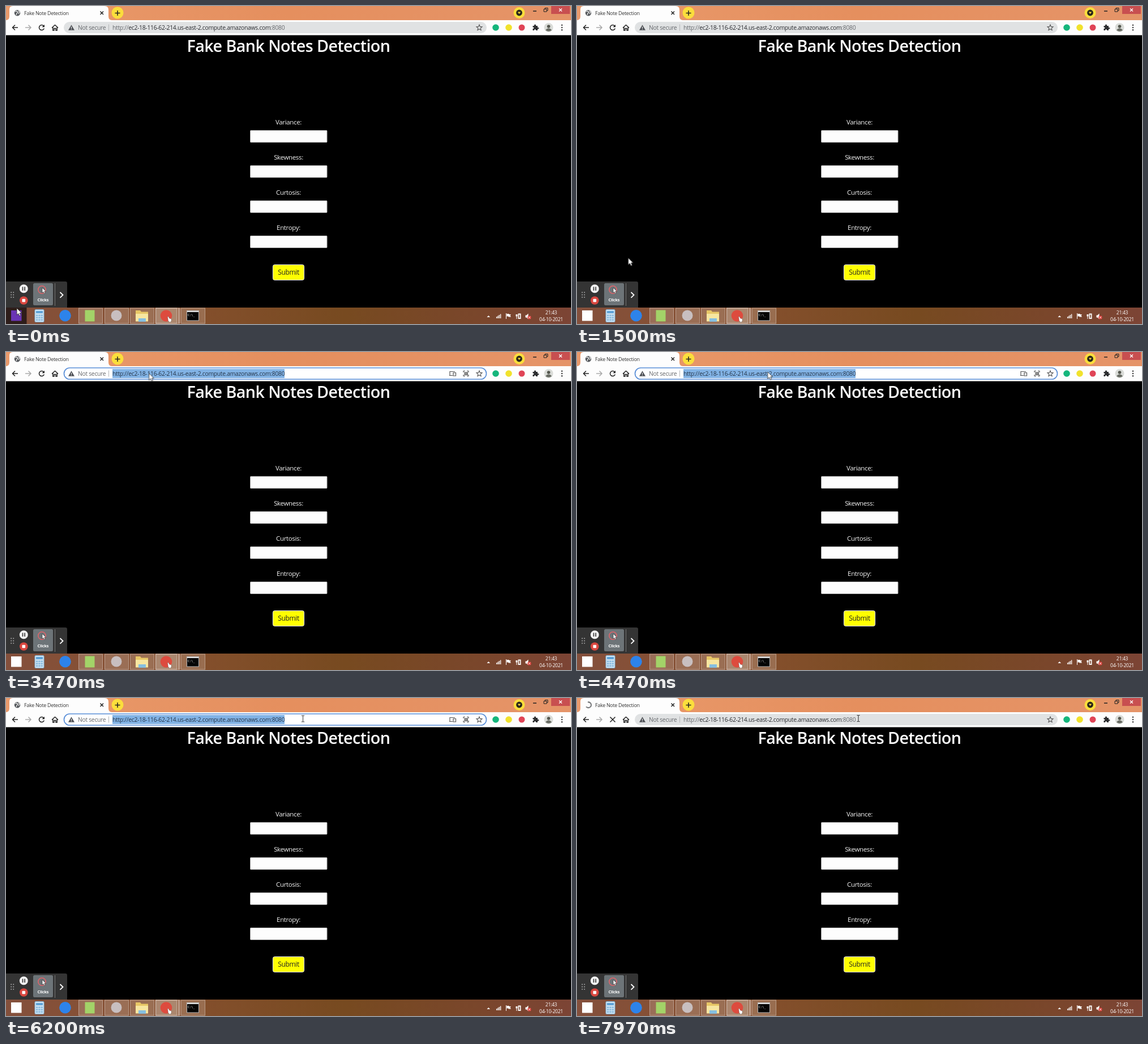
An HTML page for the animation above (8000 ms loop, 998 px wide and 561 px high).

```html
<!DOCTYPE html>
<html lang="en">
<head>
<meta charset="utf-8">
<title>Fake Note Detection</title>
<style>
  html, body { margin: 0; width: 100%; height: 100%; overflow: hidden; background: #000; }
  svg { display: block; width: 100vw; height: 100vh; }
  text { font-family: "Open Sans", "Noto Sans", sans-serif; letter-spacing: -.03em; white-space: pre; }
  .title { letter-spacing: -.02em; }
  .mid { text-anchor: middle; }
  .line { fill: none; stroke: #222; stroke-width: 1.5; }
  .tile { fill: #fff; fill-opacity: .17; stroke: #fff; stroke-opacity: .38; }
</style>
</head>
<body>
<svg viewBox="0 0 998 561" preserveAspectRatio="none">
  <defs>
    <linearGradient id="bar">
      <stop offset="0" stop-color="#84503c"/>
      <stop offset=".3" stop-color="#86502e"/>
      <stop offset=".6" stop-color="#774a20"/>
      <stop offset=".85" stop-color="#7a462c"/>
      <stop offset="1" stop-color="#7c4435"/>
    </linearGradient>
    <linearGradient id="frame">
      <stop offset="0" stop-color="#e99a6c"/>
      <stop offset=".5" stop-color="#e58f5e"/>
      <stop offset="1" stop-color="#e59468"/>
    </linearGradient>
    <path id="arrow" d="M0 0V12.2L2.8 9.6L4.8 14L6.9 13L5 8.8H8.7Z" fill="#fff" stroke="#222" stroke-width=".8"/>
  </defs>

  <rect width="998" height="561"/>

  <!-- Window frame and tab -->
  <rect width="998" height="26" fill="url(#frame)"/>
  <path d="M0 25Q6 25 6 18V6Q6 0 12 0H174Q181 0 181 7V18Q181 25 187 25Z" fill="#fdfdfd"/>
  <g id="globe">
    <circle cx="20" cy="12.3" r="5.2" fill="#55585c"/>
    <path d="M16 10L19 9L21 11L19 13L18 16M22 8L24 11L22 14" fill="none" stroke="#f4f4f4" stroke-width="1.3"/>
  </g>
  <path id="spinner" d="M20 7.2A5 5 0 1 1 15.7 14.7" fill="none" stroke="#3b3d40" stroke-width="1.4"/>
  <text x="32" y="15.5" font-size="8.9" fill="#333">Fake Note Detection</text>
  <path class="line" d="M166.5 9.5L172 15M172 9.5L166.5 15"/>
  <circle cx="197" cy="12" r="10.5" fill="#fbde3c"/>
  <path class="line" d="M192.5 12.5H201.5M197 8V17"/>
  <circle cx="906.5" cy="12" r="10" fill="#fbde3c"/>
  <circle cx="906.5" cy="12" r="5.4" fill="#29261a"/>
  <path d="M903.8 10.6H909.2L906.5 14Z" fill="#fbde3c"/>
  <path class="line" d="M931 9H937"/>
  <path class="line" style="stroke-width:1" d="M950 5.500H955V10H950ZM952 5.500V3.500H957V8H955"/>
  <rect x="963" width="33" height="14" fill="#c84f50"/>
  <path d="M977 4.5L982 9.5M982 4.5L977 9.5" stroke="#fff" stroke-width="1.3"/>

  <!-- Toolbar -->
  <rect y="25" width="998" height="26.500" fill="#fdfdfd"/>
  <path class="line" d="M21 38H12M16 33.5L11.5 38L16 42.5"/>
  <path class="line" style="stroke:#aaa" d="M34 38H43.5M39.5 33.5L44 38L39.5 42.5"/>
  <g id="reload">
    <path class="line" d="M66.5 35.2A4.5 4.5 0 1 0 67.3 39.5"/>
    <path d="M68 32.8V37.2H63.5Z" fill="#222"/>
  </g>
  <path id="stop" class="line" d="M58.5 33.5L67.5 42.5M67.5 33.5L58.5 42.5"/>
  <path class="line" d="M81 38.5L86.5 33.5L92 38.5M82.8 37.5V43H85V39.5H88V43H90.2V37.5"/>
  <rect x="102" y="28" width="747" height="20" rx="10" fill="#e0e2e3"/>
  <g id="focus">
    <rect x="102.5" y="28" width="746" height="20" rx="10" fill="#fff" stroke="#5a8fd8" stroke-width="1.7"/>
    <rect x="188" y="30" width="304" height="16" fill="#82b3e5"/>
    <path d="M784 41V34.5H793M783 41.5H789M790 36.5H794.5V42H790Z" fill="none" stroke="#555" stroke-width="1.2"/>
    <path d="M808 36V33.5H811M814 33.5H817V36M817 40V42.5H814M811 42.5H808V40M810 36H812V37.5H810ZM813.5 36H815.5V37.5H813.5ZM810 39H812V40.5H810ZM813.5 39H815.5V40.5H813.5Z" fill="none" stroke="#555" stroke-width="1.1"/>
  </g>
  <path d="M115.5 33.2L121 42.8H110Z" fill="#505358"/>
  <path d="M115.5 36.5V39.5M115.5 40.5V41.6" stroke="#fff"/>
  <g font-size="10.4" fill="#66696d">
    <text x="127" y="41.7">Not secure</text>
    <text id="url" x="188" y="41.7">http://<tspan fill="#2a2c30">ec2-18-116-62-214.us-east-2.compute.amazonaws.com</tspan>:8080</text>
    <text id="picked" x="188" y="41.7" fill="#26364a">http://ec2-18-116-62-214.us-east-2.compute.amazonaws.com:8080</text>
  </g>
  <path d="M181.5 32.5V43.5" stroke="#b4b6b9"/>
  <path d="M836 33L837.4 36.4L841 36.7L838.2 39.1L839.1 42.6L836 40.7L832.9 42.6L833.8 39.1L831 36.7L834.6 36.4Z" fill="none" stroke="#555" stroke-width="1.1"/>
  <circle cx="865" cy="38" r="5.8" fill="#16b67c"/>
  <circle cx="888" cy="38" r="5.8" fill="#f1e22c"/>
  <circle cx="911" cy="38" r="5.5" fill="#e04456"/>
  <path d="M930.5 35H933Q932.5 32.5 934.5 32.5T936 35H939V38Q941.5 37.5 941.5 39.2T939 40.5V43H936Q936 41 934.5 41T933 43H930.5V40Q932.5 40 932.5 38.5T930.5 37.5Z" fill="#2c2d2f"/>
  <g>
    <circle cx="958.5" cy="38" r="8" fill="#dadcd8"/>
    <circle cx="958.5" cy="36" r="2.8" fill="#55574f"/>
    <path d="M953 42.5Q958.5 36 964 42.5Q958.5 47 953 42.5Z" fill="#686b63"/>
  </g>
  <g fill="#333"><circle cx="982" cy="33.7" r="1.2"/><circle cx="982" cy="38" r="1.2"/><circle cx="982" cy="42.3" r="1.2"/></g>

  <!-- Page -->
  <text class="mid title" x="499" y="81" font-size="28.7" font-weight="600" fill="#fff">Fake Bank Notes Detection</text>
  <g id="form" font-size="11.5" fill="#f4f4f4"></g>
  <rect x="471.5" y="456.5" width="55" height="27" rx="3" fill="#ff0" stroke="#f8f9fa"/>
  <text class="mid" x="499" y="474.3" font-size="12" fill="#222">Submit</text>

  <!-- Recorder panel -->
  <path d="M0 486H105Q108 486 108 489V532H0Z" fill="#343434"/>
  <g id="grip" fill="#aaa"></g>
  <circle cx="31.3" cy="498.8" r="7.5" fill="#f3f3f3"/>
  <path d="M29.5 495.5V502M33.2 495.5V502" stroke="#333" stroke-width="1.6"/>
  <circle cx="31.3" cy="519.5" r="7.3" fill="#d9473f"/>
  <rect x="28.5" y="516.7" width="5.6" height="5.6" rx=".7" fill="#fff"/>
  <rect x="48" y="489" width="35" height="39" rx="2.5" fill="#6d7478"/>
  <circle cx="63.5" cy="500.5" r="6.7" fill="none" stroke="#e0646a" stroke-width="1.6"/>
  <use href="#arrow" transform="translate(64 497) scale(.75)"/>
  <text class="mid" x="65.3" y="521.4" font-size="7.2" font-weight="700" fill="#fff">Clicks</text>
  <path d="M86.5 489V529" stroke="#777"/>
  <path d="M95.5 505L100.5 509.8L95.5 514.6" fill="none" stroke="#fff" stroke-width="1.8"/>

  <!-- Taskbar -->
  <rect y="532" width="998" height="29" fill="url(#bar)"/>
  <rect x="9" y="537" width="18.5" height="18.5" fill="#fff"/>
  <g id="hover">
    <rect y="532" width="36.5" height="29" fill="#2e1d1a"/>
    <rect x="9" y="537" width="18.5" height="18.5" fill="#6a35b5"/>
  </g>
  <g id="tiles"></g>
  <rect class="tile" x="264.5" y="533" width="37" height="27"/>
  <path d="M304.5 533V560M307 533V560" stroke="#d5b9ad"/>
  <rect x="51" y="535.5" width="16" height="22" rx="1.5" fill="#cfe3f1" stroke="#7fb2d6"/>
  <rect x="53" y="538" width="12" height="4" fill="#5fa3d8"/>
  <g id="keys" fill="#86bbe0"></g>
  <circle cx="104.5" cy="546.3" r="10.3" fill="#2d83ea"/>
  <rect x="139.5" y="536.5" width="17" height="20" fill="#a3d368"/>
  <circle cx="195" cy="546" r="9.5" fill="#c8bfc0"/>
  <path d="M229 537H237L239 539.5H251V556H229Z" fill="#e8c766"/>
  <path d="M229 543H251V556.5H229Z" fill="#f7e6a0"/>
  <path d="M234 551H247V557H234Z" fill="#86bfe0"/>
  <circle cx="283" cy="546.5" r="10.3" fill="#dd4b3e"/>
  <path d="M285.5 548L287 548L288.5 551L292 552V556L289.5 558L286.5 555.5Z" fill="#fff" stroke="#555" stroke-width=".4"/>
  <rect x="319.5" y="537.5" width="21" height="17.5" fill="#050505" stroke="#b5b5b5"/>
  <rect x="320" y="538" width="20" height="2" fill="#ddd"/>
  <text x="321" y="546.5" font-size="5.5" fill="#eee" style="font-family:'DejaVu Sans Mono',monospace">C:\_</text>

  <!-- Tray -->
  <g fill="#fff">
    <path d="M849.5 549L852.3 546L855 549Z"/>
    <path d="M866 548H867.4V551H866ZM868.3 546.5H869.7V551H868.3ZM870.6 545H872V551H870.6ZM872.9 543.5H874.3V551H872.9Z"/>
    <path d="M883 542H884V552H883ZM884.5 543H888L889 544H892L890.5 546L892 548.5H888L887 547.5H884.5Z"/>
    <path d="M904.5 542.5H909.5V552H904.5ZM900.5 544H903.5V547.5H902.5V552H901.5V547.5H900.5Z"/>
    <path d="M917.5 545.5H919.5L922.5 542.5V552.5L919.5 549.5H917.5Z"/>
    <g class="mid" font-size="8.5"><text x="963" y="544">21:43</text><text x="963" y="556">04-10-2021</text></g>
  </g>
  <path d="M906.2 544.5H907.8V550H906.2Z" fill="#75402b"/>
  <circle cx="924.5" cy="549.5" r="3.2" fill="#d93b36"/>
  <path d="M922.8 547.8L926.2 551.2M926.2 547.8L922.8 551.2" stroke="#fff" stroke-width=".9"/>

  <!-- Pointer -->
  <g id="pointer">
    <use id="hand" href="#arrow"/>
    <path id="beam" d="M-2.5 -5.5H-.7L0 -5L.7 -5.5H2.5M0 -5V5M-2.5 5.5H-.7L0 5L.7 5.5H2.5" fill="none" stroke="#222"/>
  </g>
</svg>
<script>
const LOOP = 8000;
const SELECT = 3230, LEAVE_TEXT = 5880, SUBMIT = 7230;
const $ = id => document.getElementById(id);

function add(parent, tag, attrs, text = '') {
  const el = document.createElementNS('http://www.w3.org/2000/svg', tag);
  for (const key in attrs) el.setAttribute(key, attrs[key]);
  el.textContent = text;
  $(parent).append(el);
}

['Variance:', 'Skewness:', 'Curtosis:', 'Entropy:'].forEach((label, i) => {
  const y = 209 + i * 62;
  add('form', 'text', { x: 499, y, class: 'mid' }, label);
  add('form', 'rect', { x: 431.5, y: y + 10.5, width: 135.5, height: 21, rx: 1, fill: '#fdfdfd', stroke: '#aaa' });
});
for (let i = 0; i < 6; i++)
  add('grip', 'circle', { cx: 9.2 + (i % 2) * 4, cy: 505.2 + (i >> 1) * 4.3, r: 1 });
for (let i = 0; i < 9; i++)
  add('keys', 'rect', { x: 53 + (i % 3) * 4.3, y: 544.5 + Math.floor(i / 3) * 4, width: 3.3, height: 2.6 });
for (const x of [128.5, 174.5, 219.5, 264.5, 309.5])
  add('tiles', 'rect', { x, y: 533, width: 42, height: 27, class: 'tile' });

const play = (id, frames) => $(id).animate(frames, { duration: LOOP, iterations: Infinity });

// Each span is [from, to] in ms during which the part is visible.
function show(id, ...spans) {
  const frames = [{ offset: 0, opacity: 0, easing: 'step-end' }];
  for (const [from, to] of spans) {
    frames.push({ offset: from / LOOP, opacity: 1, easing: 'step-end' });
    frames.push({ offset: to / LOOP, opacity: 0, easing: 'step-end' });
  }
  play(id, frames);
}

show('hover', [0, 480]);
show('focus', [SELECT, SUBMIT]);
show('picked', [SELECT, SUBMIT]);
show('url', [0, SELECT], [SUBMIT, LOOP]);
show('globe', [0, SUBMIT]);
show('reload', [0, SUBMIT]);
show('spinner', [SUBMIT, LOOP]);
show('stop', [SUBMIT, LOOP]);
show('hand', [0, 3080], [SELECT, LEAVE_TEXT]);
show('beam', [3080, SELECT], [LEAVE_TEXT, LOOP]);

const path = [
  [0, 19, 533], [250, 21, 532], [700, 48, 500], [1500, 90.5, 444.5],
  [1800, 98, 425], [2630, 171, 254], [3100, 247, 40], [3470, 252.5, 37.5],
  [3800, 256, 36], [5200, 424.5, 34], [5880, 500, 36], [6200, 524.5, 36.5],
  [6700, 524.5, 36.5], [7400, 497, 36], [LOOP, 497, 36]
];
play('pointer', path.map(([ms, x, y]) => ({ offset: ms / LOOP, transform: `translate(${x}px, ${y}px)` })));

$('spinner').style.transformOrigin = '20px 12.3px';
play('spinner', [{ transform: 'rotate(0deg)' }, { transform: 'rotate(2880deg)' }]);
</script>
</body>
</html>
```
